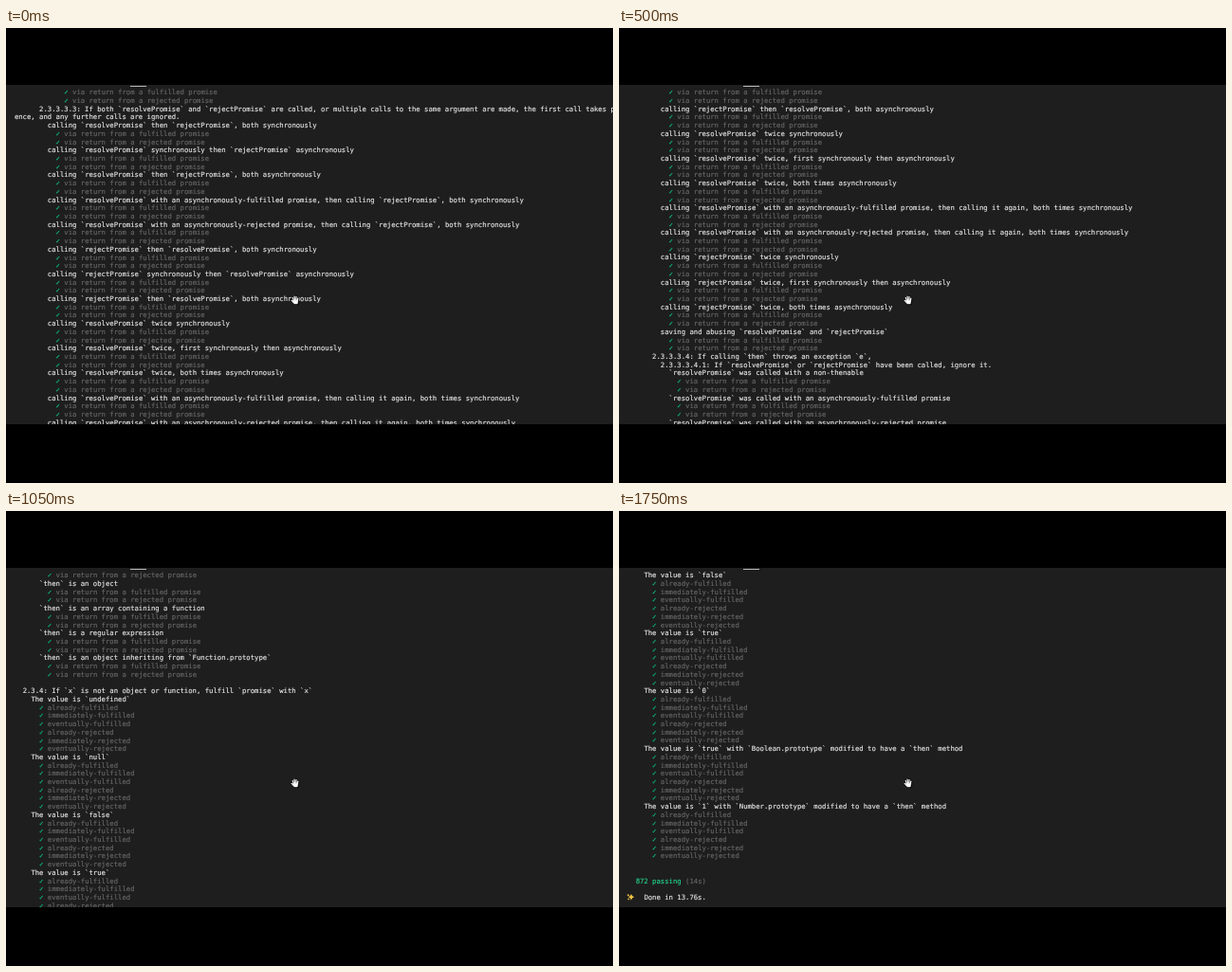
An HTML page that plays this animation: 640x480 px, repeating every 2 s.

```html
<!DOCTYPE html>
<html lang="en">
<head>
<meta charset="utf-8">
<title>Promise test run</title>
<style>
  html, body { margin: 0; width: 100%; height: 100%; overflow: hidden; background: #000; }
  svg { display: block; width: 100%; height: 100%; }
  text {
    font: 7.258px "DejaVu Sans Mono", "Liberation Mono", monospace;
    text-rendering: geometricPrecision;
    fill: currentColor;
    stroke: currentColor;
    stroke-width: .16px;
  }
  .plain { color: #e5e5e5; }
  .dim { color: #666; }
  .check { color: #0dbc79; }
  .pass { color: #23d18b; }
</style>
</head>
<body>
<svg viewBox="0 0 640 480">
  <defs>
    <clipPath id="panel"><rect y="60" width="640" height="358"/></clipPath>
    <path id="star" d="M0-1Q.2-.2 1 0Q.2.2 0 1Q-.2.2-1 0Q-.2-.2 0-1Z"/>
    <path id="fingers" d="M302.2 284.4L303.6 288M304 283.2L304.7 287M306 283.4V287M307.9 285L307.2 288M301.1 287.3L303.2 289.6"/>
    <path id="palm" d="M302.8 287.2H307.9L307.2 291H303.9Z"/>
  </defs>
  <rect width="640" height="480" fill="#000"/>
  <rect y="60" width="640" height="358" fill="#1e1e1e"/>
  <rect x="131" y="61" width="17" height="1" fill="#b8b8b8"/>
  <g clip-path="url(#panel)"><g id="log"></g></g>
  <g stroke-linecap="round" stroke-linejoin="round">
    <g fill="none" stroke="#000" stroke-width="2.6">
      <use href="#fingers"/><use href="#palm"/>
    </g>
    <use href="#fingers" fill="none" stroke="#fff" stroke-width="1.2"/>
    <use href="#palm" fill="#fff" stroke="#fff" stroke-width=".5"/>
  </g>
</svg>
<script>
const NS = "http://www.w3.org/2000/svg";
const LEFT = 8.9, TOP = 70.3, COL = 4.37, PITCH = 8.71, ROWS = 41;
const TICK = 50, LOOP = 2000;
const log = document.getElementById("log");
const lines = [];

function add(parent, tag, attrs, text = "") {
  const el = document.createElementNS(NS, tag);
  for (const key in attrs) el.setAttribute(key, attrs[key]);
  el.textContent = text;
  return parent.appendChild(el);
}

// Each part is [column, class, text].
function line(...parts) {
  const g = add(log, "g", { transform: `translate(0 ${TOP + lines.length * PITCH})` });
  for (const [col, cls, text] of parts) add(g, "text", { x: LEFT + col * COL, class: cls }, text);
  lines.push(g);
  return g;
}

const title = (col, text) => line([col, "plain", text]);
const check = (col, text) => line([col, "check", "✓"], [col + 2, "dim", text]);

function viaReturn(col) {
  for (const state of ["fulfilled", "rejected"]) check(col, `via return from a ${state} promise`);
}

function group(col, names) {
  for (const name of names) {
    title(col, name);
    viaReturn(col + 2);
  }
}

function value(name) {
  title(4, "The value is " + name);
  for (const state of ["fulfilled", "rejected"])
    for (const when of ["already", "immediately", "eventually"]) check(6, `${when}-${state}`);
}

const RES = "`resolvePromise`", REJ = "`rejectPromise`";
const settled = ["fulfilled", "rejected"].map(s => `with an asynchronously-${s} promise`);
const order = (a, b) => [
  `${a} then ${b}, both synchronously`,
  `${a} synchronously then ${b} asynchronously`,
  `${a} then ${b}, both asynchronously`
];
const twice = a => [
  `${a} twice synchronously`,
  `${a} twice, first synchronously then asynchronously`,
  `${a} twice, both times asynchronously`
];

viaReturn(12);
title(6, `2.3.3.3.3: If both ${RES} and ${REJ} are called, or multiple calls to the same argument are made, the first call takes preced`);
title(0, "ence, and any further calls are ignored.");
group(8, [
  ...order(RES, REJ),
  ...settled.map(s => `${RES} ${s}, then calling ${REJ}, both synchronously`),
  ...order(REJ, RES),
  ...twice(RES),
  ...settled.map(s => `${RES} ${s}, then calling it again, both times synchronously`),
  ...twice(REJ)
].map(s => "calling " + s));
group(8, [`saving and abusing ${RES} and ${REJ}`]);

title(6, "2.3.3.3.4: If calling `then` throws an exception `e`,");
title(8, `2.3.3.3.4.1: If ${RES} or ${REJ} have been called, ignore it.`);
group(10, [
  ...["with a non-thenable", ...settled].map(s => `${RES} was called ${s}`),
  `${REJ} was called`,
  `${RES} then ${REJ} were called`,
  `${REJ} then ${RES} were called`
]);
title(8, "2.3.3.3.4.2: Otherwise, reject `promise` with `e` as the reason.");
group(10, [
  "straightforward case",
  ...[RES, REJ].map(f => `${f} is called asynchronously before the \`throw\``)
]);

title(4, "2.3.3.4: If `then` is not a function, fulfill promise with `x`");
group(6, [
  "`5`", "an object", "an array containing a function", "a regular expression",
  "an object inheriting from `Function.prototype`"
].map(s => "`then` is " + s));
line();

title(2, "2.3.4: If `x` is not an object or function, fulfill `promise` with `x`");
["undefined", "null", "false", "true", "0"].forEach(v => value("`" + v + "`"));
for (const [v, type] of [["true", "Boolean"], ["1", "Number"]])
  value(`\`${v}\` with \`${type}.prototype\` modified to have a \`then\` method`);
line();
line();
line([2, "pass", "872 passing"], [14, "dim", "(14s)"]);
line();
const done = title(4, "Done in 13.76s.");
for (const [x, y, r] of [[12.9, -2.8, 3.2], [9.8, -4.7, 1.5], [10.1, -.7, 1.4]])
  add(done, "use", { href: "#star", fill: "#f5c542", transform: `translate(${x} ${y}) scale(${r})` });

// Three flicks of the wheel: first tick, then lines scrolled per tick.
const flicks = [
  [1, [2, 3, 4, 3, 2, 2, 3, 3, 0, 1]],
  [12, [7, 14, 15, 12, 8, 5, 3, 0, 0, 1]],
  [23, [2, 4, 4, 4, 4, 3, 3, 2, 2, 0, 1]]
];

function scrollAt(ms) {
  const tick = Math.floor(ms / TICK);
  let sum = 0;
  for (const [start, steps] of flicks)
    steps.forEach((n, i) => { if (start + i <= tick) sum += n; });
  return sum;
}

let shown = -1;
function draw(ms) {
  const first = scrollAt(ms);
  if (first === shown) return;
  shown = first;
  log.setAttribute("transform", `translate(0 ${-first * PITCH})`);
  lines.forEach((g, i) => {
    g.style.display = i >= first && i < first + ROWS ? "" : "none";
  });
}

const began = performance.now();
function frame() {
  draw((performance.now() - began) % LOOP);
  requestAnimationFrame(frame);
}
frame();
</script>
</body>
</html>
```
